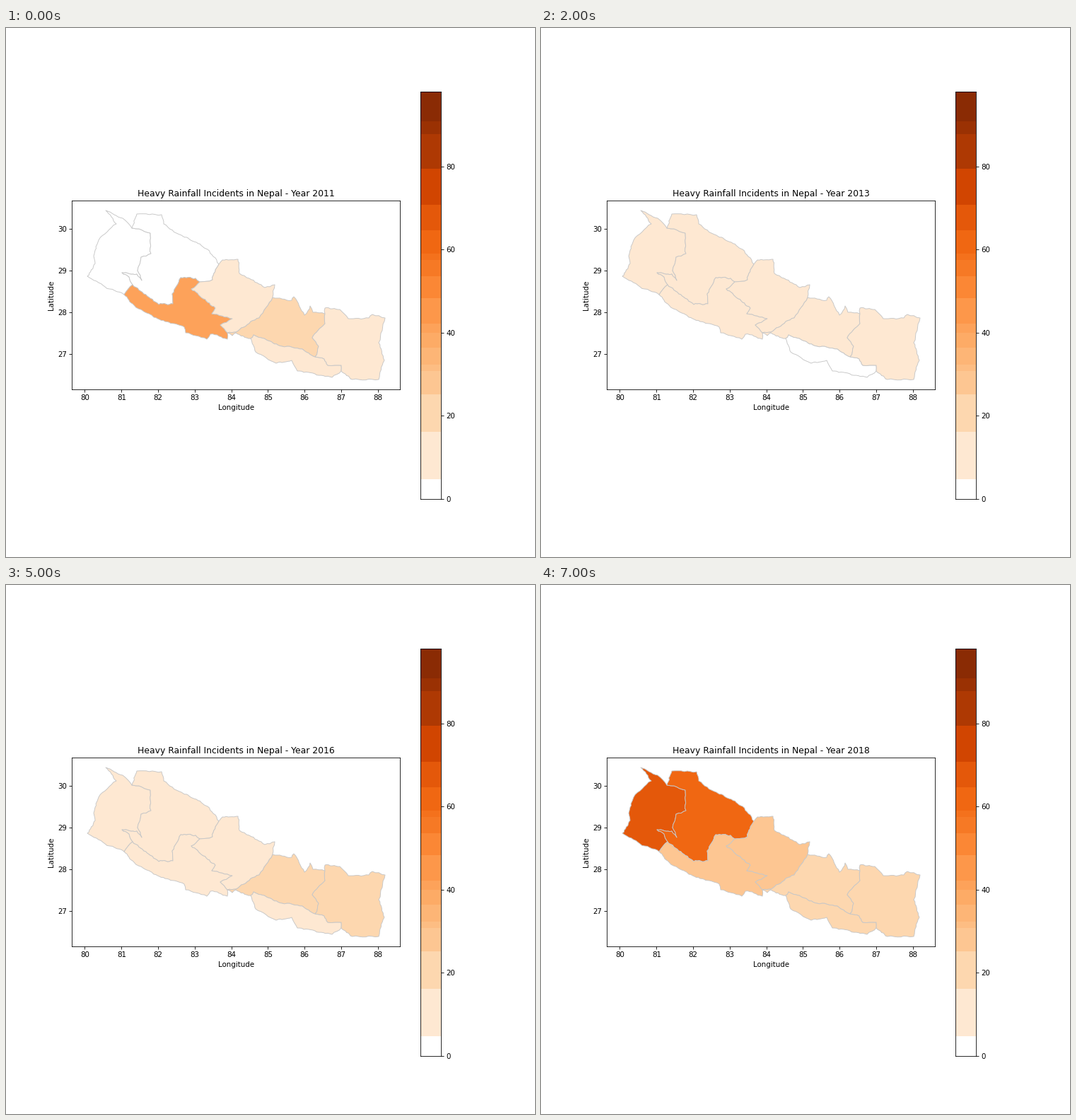
Recreate the animation shown at these times as a matplotlib script. Size 748 by 748 pixels, loop 8000 ms.

```python
import numpy as np
import matplotlib.pyplot as plt
from matplotlib.animation import FuncAnimation
from matplotlib.patches import Polygon

plt.rcParams["font.family"] = "DejaVu Sans"
SIZE, DPI = 748, 74
rng = np.random.default_rng(7)

# Points where province borders meet, in stage pixels.
NODES = {
    "a": (178, 283), "b": (167, 377), "c": (179, 363), "d": (301, 334),
    "e": (274, 359), "f": (313, 431), "h": (377, 381), "i": (451, 404),
    "j": (346, 439), "k": (437, 465), "l": (474, 485)}

# Key points passed on the way from one node to the next.
BORDERS = {
    "ba": [(140, 366), (115, 351), (126, 333), (125, 319), (131, 300),
           (156, 277), (141, 258), (165, 269)],
    "ad": [(185, 263), (220, 264), (223, 277), (248, 293), (285, 313)],
    "ac": [(188, 284), (204, 290), (205, 319), (191, 324), (186, 343),
           (192, 357), (185, 348), (164, 346), (174, 352)],
    "cb": [],
    "ce": [(216, 391), (236, 390), (235, 376), (247, 353), (268, 354)],
    "ed": [(292, 356)],
    "ef": [(262, 369), (296, 396), (291, 404), (320, 411), (303, 420)],
    "bf": [(181, 392), (209, 409), (252, 423), (254, 431), (284, 440),
           (289, 433), (313, 440)],
    "fh": [(325, 430), (346, 415), (358, 410)],
    "fj": [(320, 435), (325, 431)],
    "dh": [(306, 328), (328, 327), (330, 347), (344, 354), (366, 367),
           (380, 363)],
    "hi": [(404, 385), (407, 380), (422, 406), (430, 393), (434, 402)],
    "il": [(451, 396), (472, 398), (484, 411), (513, 410), (518, 405),
           (536, 410), (527, 445), (535, 470), (527, 497), (490, 497)],
    "ik": [(451, 418), (433, 438), (442, 450)],
    "jk": [(350, 434), (390, 450), (419, 454)],
    "jl": [(353, 458), (382, 474), (404, 470), (412, 485), (461, 494)],
    "kl": [(450, 468), (455, 477), (474, 477)]}

# Each province is a ring of nodes.
RINGS = ["bac", "adec", "cefb", "edhf", "fhikj", "jkl", "ilk"]

# Incidents per year, provinces in the order of RINGS.
INCIDENTS = {
    2011: [0, 0, 41, 10, 20, 10, 10],
    2012: [45, 45, 0, 0, 34, 0, 10],
    2013: [10, 10, 10, 10, 10, 0, 10],
    2014: [20, 20, 10, 10, 10, 10, 10],
    2015: [10, 0, 0, 0, 0, 0, 0],
    2016: [10, 10, 10, 10, 20, 10, 20],
    2017: [20, 10, 20, 10, 10, 20, 10],
    2018: [68, 62, 28, 28, 20, 20, 20],
}
YEARS = list(INCIDENTS)

STEPS = [0, 4.7, 16.2, 25.2, 30.8, 32.3, 36.4, 40, 42.2, 48.3, 53.6, 57.5,
         59, 64.7, 70.8, 79.5, 87.8, 90.9, 98]


def step_color(n):
    middle = (STEPS[n] + STEPS[n + 1]) / 2
    return plt.cm.Oranges(middle / STEPS[-1]) if n else "white"


def value_color(value):
    return step_color(np.searchsorted(STEPS, value, side="right") - 1)


def rough_edge(p, q):
    """Split an edge again and again, pushing each midpoint sideways."""
    step = q - p
    length = np.hypot(*step)
    if length < 5:
        return [p]
    normal = np.array([-step[1], step[0]]) / length
    mid = (p + q) / 2 + normal * rng.uniform(-1, 1)
    return rough_edge(p, mid) + rough_edge(mid, q)


def rough_border(name):
    points = np.array([NODES[name[0]], *BORDERS[name], NODES[name[1]]], float)
    line = [v for p, q in zip(points, points[1:]) for v in rough_edge(p, q)]
    return np.array(line + [points[-1]])


lines = {name: rough_border(name) for name in BORDERS}
lines.update({name[::-1]: line[::-1] for name, line in lines.items()})


def outline(ring):
    return np.vstack([lines[s + t] for s, t in zip(ring, ring[1:] + ring[0])])


def add_axes(left, top, right, bottom):
    return fig.add_axes([left / SIZE, 1 - bottom / SIZE,
                         (right - left) / SIZE, (bottom - top) / SIZE])


fig = plt.figure(figsize=(SIZE / DPI, SIZE / DPI), dpi=DPI, facecolor="white")

box = left, top, right, bottom = 93.3, 244.3, 557.3, 510.9
ax = add_axes(*box)
ax.set_xlim(left, right)
ax.set_ylim(bottom, top)
lons, lats = np.arange(80, 89), np.arange(27, 31)
ax.set_xticks(111.5 + 51.78 * (lons - 80), lons.astype(str))
ax.set_yticks(284.3 - 58.87 * (lats - 30), lats.astype(str))
ax.set_xlabel("Longitude")
ax.set_ylabel("Latitude")
title = ax.set_title("")
provinces = [
    ax.add_patch(Polygon(outline(ring), edgecolor="0.78", linewidth=0.9,
                         joinstyle="round"))
    for ring in RINGS]

bar = add_axes(586.3, 90.3, 615.2, 665.8)
for n, (low, high) in enumerate(zip(STEPS, STEPS[1:])):
    bar.axhspan(low, high, facecolor=step_color(n), edgecolor="none",
                antialiased=False)
bar.set_xlim(0, 1)
bar.set_ylim(0, STEPS[-1])
bar.set_xticks([])
bar.set_yticks(range(0, 81, 20))
bar.yaxis.tick_right()


def draw(i):
    year = YEARS[i]
    title.set_text(f"Heavy Rainfall Incidents in Nepal - Year {year}")
    for patch, value in zip(provinces, INCIDENTS[year]):
        patch.set_facecolor(value_color(value))
    return [title, *provinces]


anim = FuncAnimation(fig, draw, frames=len(YEARS), interval=1000,
                     repeat=True, repeat_delay=0)
plt.show()
```
